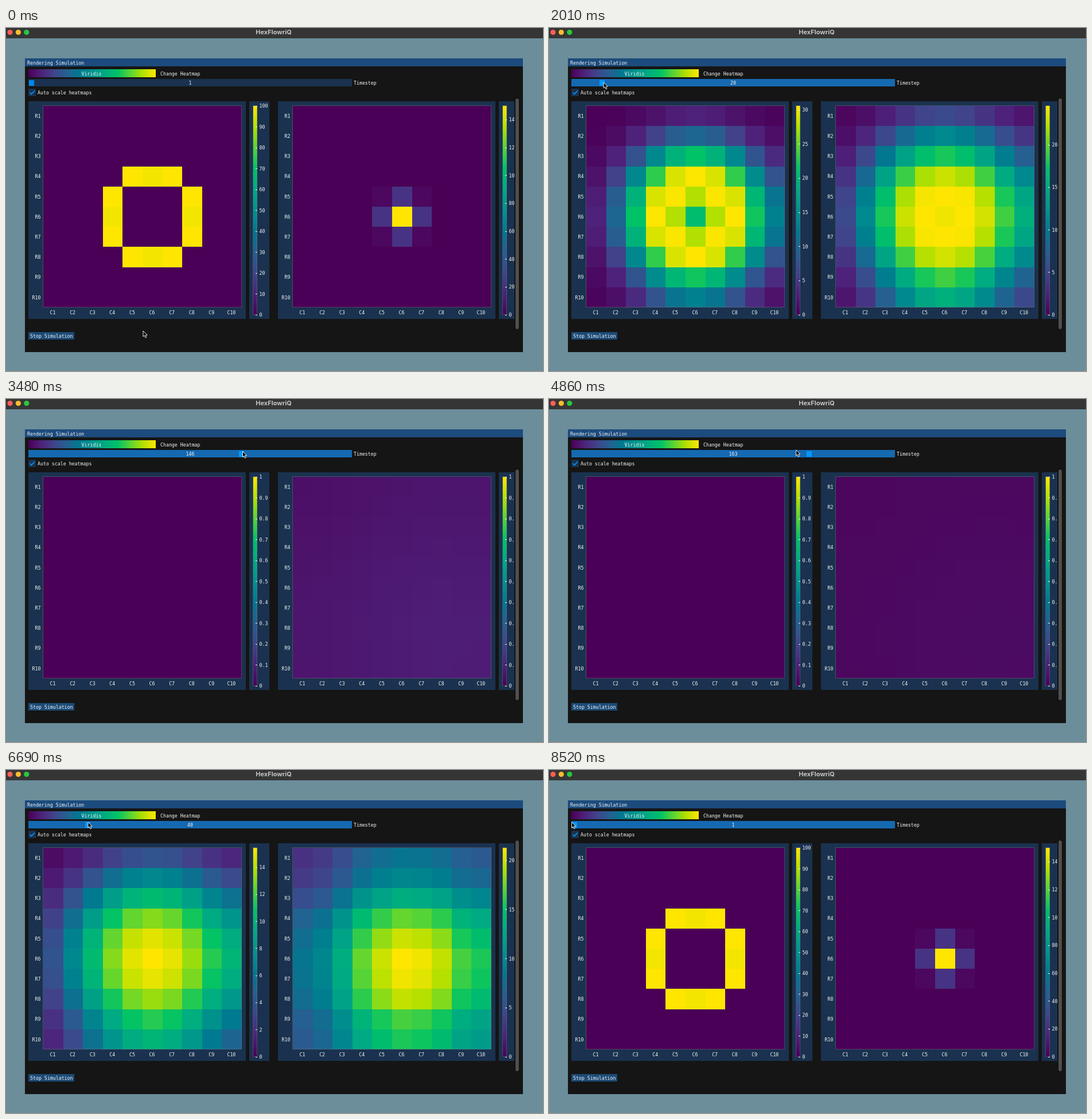
Recreate the animation shown at these times as an HTML page. Size 936 by 599 pixels, loop 9 s.

```html
<!DOCTYPE html>
<html lang="en">
<head>
<meta charset="utf-8">
<title>Heatmap simulation</title>
<style>
  html, body { margin: 0; width: 100%; height: 100%; overflow: hidden; background: #6c8d9a; }
  svg { display: block; width: 936px; height: 599px; }
  text { font: 8.25px "DejaVu Sans Mono", "Liberation Mono", monospace; fill: #f4f4f4; }
  .caption { font: bold 11px Inter, "Open Sans", sans-serif; fill: #c6c6c6; }
  rect { shape-rendering: crispEdges; }
  .round { shape-rendering: auto; }
</style>
</head>
<body>
<svg id="stage" viewBox="0 0 936 599" xmlns="http://www.w3.org/2000/svg"></svg>
<script>
const LOOP = 9000, SIZE = 10;
const stage = document.getElementById('stage');
const VIRIDIS = ['4b0057', '4e217a', '40448b', '256091', '007a90', '00948c',
                 '00ab82', '00c267', '57d435', 'b4e000', 'ffe600'];
const PANEL = '#1a324f';
const clamp = (x, lo = 0, hi = 1) => Math.min(hi, Math.max(lo, x));
const mix = (a, b, p) => a + (b - a) * p;

function add(parent, tag, attrs, content) {
  const el = document.createElementNS('http://www.w3.org/2000/svg', tag);
  for (const key in attrs) el.setAttribute(key, attrs[key]);
  if (content !== undefined) el.textContent = content;
  parent.appendChild(el);
  return el;
}
const box = (x, y, width, height, fill, parent = stage) =>
  add(parent, 'rect', { x, y, width, height, fill });
const label = (x, y, str, anchor = 'start', parent = stage) =>
  add(parent, 'text', { x, y: y + 3, 'text-anchor': anchor }, str);

const STOPS = VIRIDIS.map(h => [0, 2, 4].map(i => parseInt(h.slice(i, i + 2), 16)));
function shade(n) {
  const pos = clamp(n) * 10, i = Math.min(9, Math.floor(pos));
  return `rgb(${STOPS[i].map((a, j) => Math.round(mix(a, STOPS[i + 1][j], pos - i)))})`;
}

// Timeline rows: time, timestep, cursor x, cursor y
const PATH = [
  [0, 1, 239, 529], [780, 1, 239, 529], [1500, 1, 44, 96], [1650, 1, 44, 96],
  [2010, 20, 95, 95], [2850, 77, 239, 93], [4410, 220, 600, 90], [4530, 220, 600, 90],
  [4860, 163, 431, 89], [5250, 104, 303, 89], [6690, 40, 143, 91],
  [8520, 1, 39.5, 91], [LOOP, 1, 39.5, 91]
];
const PRESS = 1620;

// Monotone cubic interpolation of one timeline column
function track(t, col) {
  const slope = i => (PATH[i + 1][col] - PATH[i][col]) / (PATH[i + 1][0] - PATH[i][0]);
  const tangent = i => {
    if (i === 0 || i === PATH.length - 1) return 0;
    const a = slope(i - 1), b = slope(i);
    return a * b > 0 ? 2 * a * b / (a + b) : 0;
  };
  let i = 0;
  while (i < PATH.length - 2 && t >= PATH[i + 1][0]) i++;
  const span = PATH[i + 1][0] - PATH[i][0], p = (t - PATH[i][0]) / span, q = 1 - p;
  return PATH[i][col] * (1 + 2 * p) * q * q + PATH[i + 1][col] * p * p * (3 - 2 * p)
    + span * (tangent(i) * p * q * q - tangent(i + 1) * p * p * q);
}

// Peak values fall geometrically between keys
function peak(keys, v) {
  let i = 0;
  while (i < keys.length - 2 && v > keys[i + 1][0]) i++;
  const [v0, a] = keys[i], [v1, b] = keys[i + 1];
  return a * Math.pow(b / a, (v - v0) / (v1 - v0));
}
const PREY_PEAK = [[1, 100], [20, 30.6], [40, 15.44], [60, 0.01], [220, 1e-6]];
const HUNTER_PEAK = [[1, 150], [20, 24.6], [40, 21.3], [77, 4.84], [104, 1], [163, 0.033]];

function grid(fn) {
  const cells = Array.from({ length: SIZE * SIZE },
    (_, i) => fn(Math.floor(i / SIZE) + 1, i % SIZE + 1));
  const top = Math.max(...cells);
  return cells.map(x => x / top);
}
const blend = (a, b, p) => a.map((x, i) => mix(x, b[i], p));

// Diffusion from given positions, reflected at the right and bottom walls
const spread = (x, s, from) => from.reduce((sum, a) =>
  sum + Math.exp(-((x - a) ** 2) / (2 * s)) + Math.exp(-((21 - x - a) ** 2) / (2 * s)), 0);

function ring(s, dip, soft) {
  const inner = x => spread(x, s, [5, 6, 7]), outer = x => spread(x, s, [4, 8]);
  return grid((r, c) => {
    const hole = Math.exp(-((r - 6) ** 2 + (c - 6) ** 2) / 1.6);
    return (inner(r) * outer(c) + outer(r) * inner(c)) * (1 - dip * hole);
  }).map(y => y * (1 + soft) / (1 + soft * y));
}
const point = s => grid((r, c) => spread(r, s, [6]) * spread(c, s, [6]));
const product = p => grid((r, c) => p[r - 1] * p[c - 1]);

function preyField(v) {
  const late = clamp((v - 20) / 20);
  return ring(0.115 * (Math.min(v, 60) - 1) + 0.03, 0.42 * (1 - late), 0.45 * late);
}

const hunterRing = v => ring(1.1 + 0.115 * v, 0.15, 0.45);
const LATE = [
  [20, hunterRing(20)],
  [40, product([.38, .45, .61, .815, .93, 1, .98, .92, .78, .73])],
  [77, product([.55, .59, .68, .8, .935, 1, .99, .95, .89, .86])],
  [104, product([.72, .75, .79, .85, .91, .95, .98, 1, .99, .98])]
];
function hunterField(v) {
  if (v < 20) return blend(point(0.264 + 0.115 * (v - 1)), hunterRing(v), clamp((v - 1) / 12));
  const i = v < 40 ? 0 : v < 77 ? 1 : 2;
  const [v0, a] = LATE[i], [v1, b] = LATE[i + 1];
  return blend(a, b, clamp((v - v0) / (v1 - v0)));
}

function niceStep(range) {
  const nice = (x, limits) => {
    const base = 10 ** Math.floor(Math.log10(x)), f = x / base;
    return base * [1, 2, 5, 10].find((_, i) => i === 3 || f < limits[i]);
  };
  return nice(nice(range * 0.99, [1.0001, 2.0001, 5.0001]) / 8, [1.5, 3, 7]);
}

// Static window
const defs = add(stage, 'defs', {});
function gradient(id, dir) {
  const g = add(defs, 'linearGradient', { id, x1: 0, y1: 0, x2: 0, y2: 0, ...dir });
  VIRIDIS.forEach((h, i) => add(g, 'stop', { offset: i / 10, 'stop-color': '#' + h }));
}
gradient('across', { x2: 1 });
gradient('upward', { y1: 1 });
add(add(defs, 'clipPath', { id: 'child' }), 'rect', { x: 33, y: 120, width: 853, height: 400 });

box(0, 0, 936, 599, '#6c8d9a');
box(0, 0, 936, 18, '#353535');
['#ff5f57', '#febc2e', '#28c840'].forEach((fill, i) =>
  add(stage, 'circle', { cx: 7 + i * 14.4, cy: 7.5, r: 4.6, fill }));
add(stage, 'text', { x: 466.5, y: 11, 'text-anchor': 'middle', class: 'caption' }, 'HexFlowriQ');
box(33, 53, 868, 513, '#151515');
box(33, 53, 868, 14, '#1c4b7d');
label(37, 60.5, 'Rendering Simulation');
box(39, 72, 222, 14, 'url(#across)');
label(149, 79.5, 'Viridis', 'middle');
label(269, 79.5, 'Change Heatmap');
const slider = box(39, 89, 564, 13, PANEL);
const grab = box(40, 91, 9, 10, '#0087e6');
const stepText = label(321, 96, '1', 'middle');
label(606, 96, 'Timestep');
box(39, 106, 13, 13, PANEL);
add(stage, 'path', { d: 'M41.5 112.5l2.8 3 5.5-6', fill: 'none', stroke: '#0098ff', 'stroke-width': 1.7 });
label(55, 112.5, 'Auto scale heatmaps');
box(887, 122, 8, 404, '#0d0d0d');
add(stage, 'rect', { x: 888, y: 123, width: 6, height: 403, rx: 3, fill: '#4f4f4f', class: 'round' });
box(39, 531, 80, 13, '#1c4b77');
label(42, 537.5, 'Stop Simulation');

function makePlot(dx) {
  const root = add(stage, 'g', { 'clip-path': 'url(#child)' });
  const g = add(root, 'g', { transform: `translate(${dx} 0)` });
  const w = 346 / SIZE, h = 352 / SIZE;
  box(39, 128, 379, 380, PANEL, g);
  box(424, 128, 35, 380, PANEL, g);
  const cells = Array.from({ length: SIZE * SIZE }, (_, i) =>
    box(65 + i % SIZE * w, 136 + Math.floor(i / SIZE) * h, w, h, shade(0), g));
  add(g, 'rect', { x: 64.5, y: 135.5, width: 346, height: 352, fill: 'none',
                   stroke: '#6e6e80', 'stroke-opacity': .5 });
  for (let i = 0; i < SIZE; i++) {
    label(60.5, 153.8 + i * h, 'R' + (i + 1), 'end', g);
    label(81.5 + i * w, 497, 'C' + (i + 1), 'middle', g);
  }
  box(431, 136, 7, 365, 'url(#upward)', g);
  add(g, 'rect', { x: 430.5, y: 135.5, width: 7, height: 365, fill: 'none',
                   stroke: '#6e6e80', 'stroke-opacity': .5 });
  const ticks = Array.from({ length: 20 }, () => ({
    line: box(435, 0, 3, 1, '#f4f4f4', g), text: label(441.5, 0, '', 'start', g)
  }));
  return (field, top) => {
    const range = Math.max(1, top), step = niceStep(range);
    cells.forEach((cell, i) => cell.setAttribute('fill', shade(field[i] * top / range)));
    ticks.forEach(({ line, text }, i) => {
      const shown = i * step <= range * 1.0001, y = 501 - 365 * i * step / range;
      line.setAttribute('display', shown ? 'inline' : 'none');
      text.setAttribute('display', shown ? 'inline' : 'none');
      line.setAttribute('y', Math.round(y - .5));
      text.setAttribute('y', y + 3);
      text.textContent = +(i * step).toPrecision(4);
    });
  };
}
const drawPrey = makePlot(0), drawHunter = makePlot(435);

const cursor = add(stage, 'path', {
  d: 'M0 0V10L2.3 7.9 4 11.8 5.8 11 4.1 7.2H7.2Z', fill: '#000', stroke: '#fff', 'stroke-width': .9
});

let drawn = 0;
function render(t) {
  const step = Math.round(clamp(track(t, 1), 1, 220));
  const x = track(t, 2), y = track(t, 3);
  const active = t >= PRESS, hover = y > 89 && y < 102;
  slider.setAttribute('fill', active ? '#1569b1' : hover ? '#1d4a75' : PANEL);
  grab.setAttribute('fill', active ? '#0098ff' : '#0087e6');
  grab.setAttribute('x', 39.5 + (step - 1) * 2.53);
  cursor.setAttribute('transform', `translate(${x} ${y})`);
  if (step === drawn) return;
  drawn = step;
  stepText.textContent = step;
  drawPrey(preyField(step), peak(PREY_PEAK, step));
  drawHunter(hunterField(step), peak(HUNTER_PEAK, step));
}

const start = performance.now();
function tick(now) {
  render(Math.max(0, now - start) % LOOP);
  requestAnimationFrame(tick);
}
render(0);
requestAnimationFrame(tick);
</script>
</body>
</html>
```
